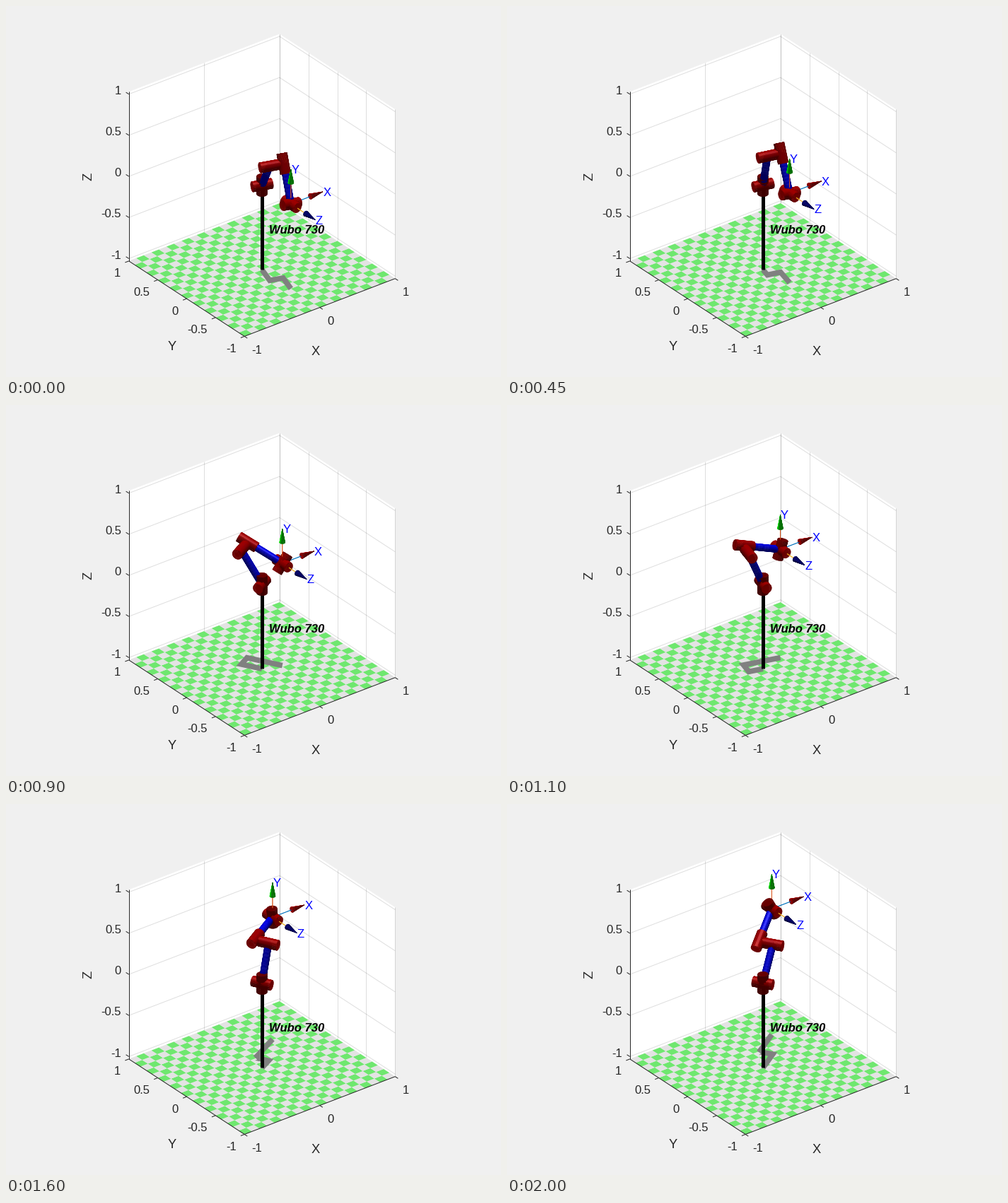
Write a matplotlib script that moves like this. It is 700 by 525 pixels and loops after 2.05 s.

```python
import numpy as np
import matplotlib.pyplot as plt
from matplotlib.animation import FuncAnimation
from matplotlib.collections import LineCollection, PolyCollection

W, H, DPI = 700, 525, 100
STEPS = 41
PT = 72 / DPI
plt.rcParams["font.family"] = "Liberation Sans"

# Orthographic view
AZ, EL, SCALE = np.radians(37.5), np.radians(30), 134.3
CENTRE = np.array([362.0, 253.5])
RIGHT = np.array([np.cos(AZ), -np.sin(AZ), 0])
UP = np.array([np.sin(AZ) * np.sin(EL), np.cos(AZ) * np.sin(EL), np.cos(EL)])
EYE = np.array([-np.sin(AZ) * np.cos(EL), -np.cos(AZ) * np.cos(EL), np.sin(EL)])
ZLIM = 1.03
INK = "#262626"

# Arm geometry
A2, A3, D3, D4 = 0.4318, 0.0203, 0.15005, 0.4318
FOREARM = np.hypot(A3, D4)
LINK_R, JOINT_R, JOINT_HALF = 0.036, 0.055, 0.108
START, END = np.array([0, -0.5, 0]), np.array([0.5, 0.5, 0.5])
AXIS_LEN, CONE_LEN, CONE_R = 0.42, 0.165, 0.03
RED, BLUE = np.array([0.7, 0, 0]), np.array([0, 0, 1.0])
TOP_LAMP = np.array([0, 0, 1.0])
SIDE_LAMP = (UP - RIGHT) / np.sqrt(2)

TOOL_AXES = [
    ("X", np.array([1.0, 0, 0]), (0, 0.447, 0.741), np.array([0.9, 0, 0])),
    ("Y", np.array([0, 0, 1.0]), (0.85, 0.325, 0.098), np.array([0, 1.2, 0])),
    ("Z", np.array([0, -1.0, 0]), (0.929, 0.694, 0.125), np.array([0, 0, 0.6])),
]


def project(p):
    p = np.asarray(p, float)
    return np.stack([CENTRE[0] + SCALE * (p @ RIGHT),
                     CENTRE[1] - SCALE * (p @ UP)], axis=-1)


def unit(v):
    return v / np.linalg.norm(v)


def ease(u):
    """Linear ramp with parabolic blends over each third."""
    if u < 1 / 3:
        return 2.25 * u * u
    if u > 2 / 3:
        return 1 - 2.25 * (1 - u) ** 2
    return 0.25 + 1.5 * (u - 1 / 3)


def solve(p):
    """Elbow-up joint positions and axes for a wrist at p."""
    r = -np.sqrt(p[0] ** 2 + p[1] ** 2 - D3 ** 2)
    q1 = np.arctan2(p[1], p[0]) - np.arctan2(-D3, r)
    x1 = np.array([np.cos(q1), np.sin(q1), 0])
    z1 = np.array([np.sin(q1), -np.cos(q1), 0])

    def arm(angle):
        return np.cos(angle) * x1 + np.sin(angle) * TOP_LAMP

    dist = np.hypot(r, p[2])
    bend = np.arccos(np.clip((A2 ** 2 + dist ** 2 - FOREARM ** 2) / (2 * A2 * dist), -1, 1))
    q2 = np.arctan2(p[2], r) - bend
    lean = np.arctan2(p[2] - A2 * np.sin(q2), r - A2 * np.cos(q2))
    q23 = lean - np.pi / 2 + np.arctan2(A3, D4)
    elbow = A2 * arm(q2)
    side = elbow + D3 * z1
    return elbow, side, side + A3 * arm(q23), z1, arm(q23 + np.pi / 2)


class Scene:
    """Collects small faces and sorts them back to front."""

    def __init__(self):
        self.faces, self.depths, self.colors = [], [], []

    def add(self, quads, colors):
        self.faces.append(project(quads))
        self.depths.append(quads.mean(axis=1) @ EYE)
        self.colors.append(np.clip(colors, 0, 1))

    def solid(self, p0, p1, r0, r1, color, lamp=TOP_LAMP, gloss=0.3, rows=9, n=28):
        w = unit(p1 - p0)
        u = unit(np.cross(w, [0.31, 0.52, 0.79]))
        v = np.cross(w, u)
        a = np.linspace(0, 2 * np.pi, n + 1)
        ring = np.outer(np.cos(a), u) + np.outer(np.sin(a), v)
        t = np.linspace(0, 1, rows + 1)[:, None, None]
        pts = p0 + t * (p1 - p0) + (r0 + t * (r1 - r0)) * ring
        quads = np.stack([pts[:-1, :-1], pts[1:, :-1], pts[1:, 1:], pts[:-1, 1:]], axis=2)
        mid = a[:-1] + np.pi / n
        normal = np.outer(np.cos(mid), u) + np.outer(np.sin(mid), v)
        normal = normal + w * (r0 - r1) / np.linalg.norm(p1 - p0)
        normal /= np.linalg.norm(normal, axis=1)[:, None]
        lit = np.maximum(normal @ lamp, 0)
        shine = np.maximum(2 * lit * (normal @ EYE) - lamp @ EYE, 0) ** 10
        shade = (0.36 + 0.54 * lit)[:, None] * color + gloss * shine[:, None]
        front = normal @ EYE > 0
        self.add(quads[:, front].reshape(-1, 4, 3), np.tile(shade[front], (rows, 1)))
        for c, rim, out in ((p0, pts[0], -w), (p1, pts[-1], w)):
            if out @ EYE > 0:
                fan = np.stack([np.tile(c, (n, 1)), rim[:-1], rim[1:], rim[1:]], axis=1)
                self.add(fan, np.tile(0.58 * color, (n, 1)))

    def tube(self, p0, p1):
        self.solid(p0, p1, LINK_R, LINK_R, BLUE, rows=12)

    def joint(self, p, axis):
        h = JOINT_HALF * axis
        self.solid(p - h, p + h, JOINT_R, JOINT_R, RED)

    def wire(self, p0, p1, color, n=14):
        t = np.linspace(0, 1, n + 1)[:, None]
        pts = p0 + t * (p1 - p0)
        off = 0.0018 * unit(np.cross(p1 - p0, EYE))
        quads = np.stack([pts[:-1] - off, pts[1:] - off, pts[1:] + off, pts[:-1] + off], axis=1)
        self.add(quads, np.tile(color, (n, 1)))

    def sorted(self):
        order = np.argsort(np.concatenate(self.depths))
        return np.concatenate(self.faces)[order], np.concatenate(self.colors)[order]


fig = plt.figure(figsize=(W / DPI, H / DPI), dpi=DPI, facecolor="#f0f0f0")
ax = fig.add_axes([0, 0, 1, 1])
ax.set_xlim(0, W)
ax.set_ylim(H, 0)
ax.axis("off")


def label(x, y, s, ha="left", size=12, color=INK, **kw):
    """Text whose capitals are centred on y."""
    return ax.text(x, y + size / PT * 0.36, s, ha=ha, va="baseline",
                   fontsize=size, color=color, zorder=20, **kw)


def lines(segs, z, **kw):
    ax.add_collection(LineCollection([project(s) for s in segs], linewidths=PT,
                                     zorder=z, **kw))


def draw_stage():
    b = ZLIM
    walls = [[(-1, 1, -b), (1, 1, -b), (1, 1, b), (-1, 1, b)],
             [(1, 1, -b), (1, -1, -b), (1, -1, b), (1, 1, b)]]
    ax.add_collection(PolyCollection([project(w) for w in walls], facecolors="white",
                                     edgecolors="none", zorder=1))
    grid = [[(x, 1, -b), (x, 1, b)] for x in (-1, 0, 1)]
    grid += [[(1, y, -b), (1, y, b)] for y in np.linspace(-1, 1, 5)]
    for z in np.linspace(-1, 1, 5):
        grid += [[(-1, 1, z), (1, 1, z)], [(1, 1, z), (1, -1, z)]]
    lines(grid, 2, colors=INK, alpha=0.15)

    tiles, paint = [], []
    edge = np.linspace(-1, 1, 21)
    for i in range(20):
        for j in range(20):
            x0, x1, y0, y1 = edge[i], edge[i + 1], edge[j], edge[j + 1]
            tiles.append(project([(x0, y0, -b), (x1, y0, -b), (x1, y1, -b), (x0, y1, -b)]))
            paint.append("#e3e3e3" if (i + j) % 2 else "#6fe76f")
    ax.add_collection(PolyCollection(tiles, facecolors=paint, edgecolors="none", zorder=3))

    k = 0.05
    axes = [[(-1, 1, b), (-1, 1, -b)], [(-1, 1, -b), (-1, -1, -b)], [(-1, -1, -b), (1, -1, -b)]]
    axes += [[(x, -1, -b), (x, -1 - k, -b)] for x in (-1, 0, 1)]
    for v in np.linspace(-1, 1, 5):
        axes += [[(-1, v, -b), (-1 - k, v, -b)], [(-1, 1, v), (-1, 1 + k, v)]]
    lines(axes, 4, colors=INK)

    for i, v in enumerate((-1, 0, 1)):
        label(347.5 + 106.6 * i, 486 - 41.2 * i, f"{v}")
    for i, v in enumerate(np.linspace(-1, 1, 5)):
        label(326 - 41 * i, 484 - 26.7 * i, f"{v:g}", ha="right")
        label(163, 351.5 - 58.1 * i, f"{v:g}", ha="right")
    label(437.5, 487, "X", ha="center", size=13.2)
    label(234.5, 480, "Y", ha="center", size=13.2)
    ax.text(117, 241, "Z", rotation=90, ha="center", va="center",
            fontsize=13.2, color=INK, zorder=20)
    label(371.5, 316.5, "Wubo 730", color="black", weight="bold", style="italic")
    pole = project([(0, 0, 0), (0, 0, -b)])
    ax.plot(*pole.T, color="black", lw=5 * PT, solid_capstyle="butt", zorder=6)


draw_stage()
shadow, = ax.plot([], [], color="#808080", lw=7.6 * PT, solid_capstyle="butt",
                  solid_joinstyle="miter", zorder=5)
body = PolyCollection([], linewidths=0.5 * PT, joinstyle="round", snap=False, zorder=10)
ax.add_collection(body)
tags = [label(0, 0, name, color="blue") for name, *_ in TOOL_AXES]


def draw(i):
    wrist = START + ease(i / (STEPS - 1)) * (END - START)
    base = np.zeros(3)
    elbow, side, fore, z1, z3 = solve(wrist)

    path = np.array([base, elbow, side, fore, wrist])
    path[:, 2] = -ZLIM
    shadow.set_data(*project(path).T)

    scene = Scene()
    scene.tube(base, elbow)
    scene.tube(elbow, side)
    scene.tube(fore, wrist)
    scene.joint(base, TOP_LAMP)
    scene.joint(base, z1)
    scene.joint(elbow, z1)
    scene.joint(fore, z3)
    tool_z = TOOL_AXES[2][1]
    scene.joint(wrist, unit(np.cross(z3, tool_z)))
    scene.joint(wrist, tool_z)
    for (_, d, line, color), tag in zip(TOOL_AXES, tags):
        tip = wrist + AXIS_LEN * d
        neck = tip - CONE_LEN * d
        scene.wire(wrist, neck, line)
        scene.solid(neck, tip, CONE_R, 0.0, color, lamp=SIDE_LAMP, gloss=0, rows=4, n=20)
        x, y = project(tip)
        tag.set_position((x + 0.5, y + 12 / PT * 0.36))

    faces, colors = scene.sorted()
    body.set_verts(faces)
    body.set_facecolor(colors)
    body.set_edgecolor(colors)
    return [shadow, body, *tags]


anim = FuncAnimation(fig, draw, frames=STEPS, interval=50, repeat=True,
                     repeat_delay=0, blit=False)
plt.show()
```
